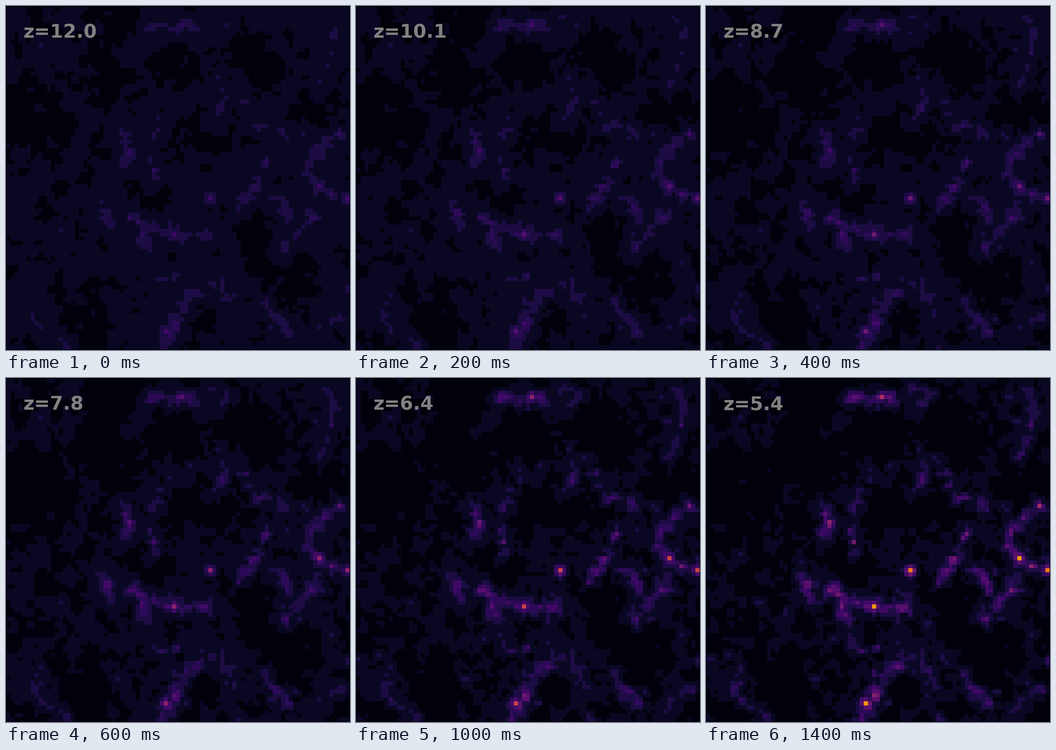
A matplotlib script for the animation above (1.5 s loop, 748 by 749 pixels).

```python
import numpy as np
import matplotlib.pyplot as plt
from matplotlib.animation import FuncAnimation
from matplotlib.colors import ListedColormap

W, H, DPI = 748, 749, 100
N, FRAMES, STEP = 85, 15, 100
Z_START, Z_END = 11.96, 5.42

# Brightness steps on the inferno map
LEVELS = np.array([.02, .065, .115, .155, .2, .25, .31, .38, .46, .55, .63, .7, .78])
EDGES = (LEVELS[1:] + LEVELS[:-1]) / 2

# Filaments, in grid cells: start, middle and end of a parabola
BRIGHT = [
    [(82.5, 32), (75, 39), (77.4, 44.5)],
    [(77.4, 44.5), (80.5, 46.4), (84.5, 47.5)],
    [(64, 39), (62, 43.5), (58, 50)],
    [(66, 48), (69, 50), (70, 53)],
    [(76.5, 51.3), (74, 54.5), (69, 60)],
    [(51.8, 68.6), (46, 71.5), (42.8, 75)],
    [(42.8, 75), (41.5, 79), (38, 84.5)],
    [(31.5, 52.5), (34, 56), (34, 59.5)],
    [(33, 54), (40.5, 56), (50, 56.6)],
    [(23.5, 50), (25, 52), (26.7, 55)],
    [(29, 32), (30, 35), (30, 39)],
    [(36, 5.3), (41, 4.8), (45, 5.2)],
    [(64, 74), (67, 78), (70, 79.5)],
]
FAINT = [
    [(52.6, 18), (53.5, 24), (51, 28.5)],
    [(57, 19.5), (60, 25), (61.5, 30)],
    [(62, 30), (68, 31), (71, 38)],
    [(52, 69), (55, 73), (57.5, 78)],
    [(36.5, 62), (37, 67), (42, 67.5)],
    [(50, 3), (55, 4), (51, 7.6)],
    [(79, 1), (81, 9), (77.4, 20)],
    [(75, 83), (77.5, 80), (82.5, 77)],
    [(8.4, 72), (7.5, 78), (15, 84)],
    [(38, 28), (36.4, 34), (36.5, 43)],
]
# Knots: column, row, strength
KNOTS = [
    (30, 35.4, 3.6), (50, 47, 3.9), (77, 44, 4.0), (84, 47, 3.9), (80, 46, 3.2),
    (24.5, 50.5, 3.6), (41, 56, 4.0), (39.5, 55.8, 3.4), (39, 80, 4.0),
    (41.5, 79, 3.4), (36, 40, 2.8), (84, 69.5, 2.6),
]
# Voids: column, row, radius
VOIDS = [
    (6, 27, 12), (25, 19, 8), (41, 13, 7), (25, 4, 7), (61, 12, 7), (44, 31, 5.5),
    (75, 24, 5), (35, 47.5, 4.5), (62, 55, 5), (70, 68, 7), (19, 78, 7), (49, 77, 4),
]

rng = np.random.default_rng(21)
row, col = np.mgrid[:N, :N]


def smooth_noise(scale):
    """Periodic unit-variance noise with the given correlation length."""
    k = np.fft.fftfreq(N)
    decay = np.exp(-2 * (np.pi * scale) ** 2 * (k[:, None] ** 2 + k ** 2))
    out = np.fft.ifft2(np.fft.fft2(rng.standard_normal((N, N))) * decay).real
    return (out - out.mean()) / out.std()


def curve_distance(points):
    t = np.linspace(0, 1, 40)
    weights = np.array([(1 - t) * (1 - 2 * t), 4 * t * (1 - t), t * (2 * t - 1)])
    x, y = np.array(points).T @ weights
    return np.hypot(col[..., None] + .5 - x, row[..., None] + .7 - y).min(axis=2)


def build_field():
    field = np.full((N, N), .4)
    for cx, cy, radius in VOIDS:
        r = np.hypot(col - cx, row - cy) / radius
        field = np.minimum(field, .4 - 1.2 / (1 + np.exp(6 * (r - .95))))
    # Ridges of smooth noise make the thin web between the filaments
    field += .36 * smooth_noise(.7) + .45 * (.8 - np.abs(smooth_noise(2.5)))
    grain = .42 * smooth_noise(.6)
    for strength, group in ((2.35, BRIGHT), (1.75, FAINT)):
        for points in group:
            field = np.maximum(field, strength - .62 * curve_distance(points) + grain)
    for cx, cy, strength in KNOTS:
        field = np.maximum(field, strength - 1.3 * np.hypot(col - cx, row - cy))
    return field


field = build_field()
drift = .25 * smooth_noise(.9) * (field < 2.6)


def redshift(i):
    # Cosmic time, which goes as (1 + z) ** -1.5, advances evenly
    t0, t1 = (1 + Z_START) ** -1.5, (1 + Z_END) ** -1.5
    return (t0 + (t1 - t0) * i / (FRAMES - 1)) ** (-2 / 3) - 1


def density(z):
    growth = (1 + Z_START) / (1 + z)
    g = field + drift * (growth - 1.5)
    return np.digitize(.045 * np.exp(.4 * (growth * g - growth + 1)), EDGES)


fig = plt.figure(figsize=(W / DPI, H / DPI), dpi=DPI, facecolor="black")
ax = fig.add_axes([0, 0, 1, 1])
ax.axis("off")
image = ax.imshow(density(Z_START), cmap=ListedColormap(plt.cm.inferno(LEVELS)),
                  vmin=-.5, vmax=len(LEVELS) - .5, interpolation="nearest",
                  extent=(1, 747, 748, 2), aspect="auto")
ax.set_xlim(0, W)
ax.set_ylim(H, 0)
label = ax.text(37, 69, "", color="#828282", fontsize=29.6, weight="bold",
                family="DejaVu Sans", va="baseline")


def update(i):
    z = redshift(i)
    image.set_data(density(z))
    label.set_text(f"z={z:.1f}")
    return image, label


anim = FuncAnimation(fig, update, frames=FRAMES, interval=STEP, repeat=True)
plt.show()
```
